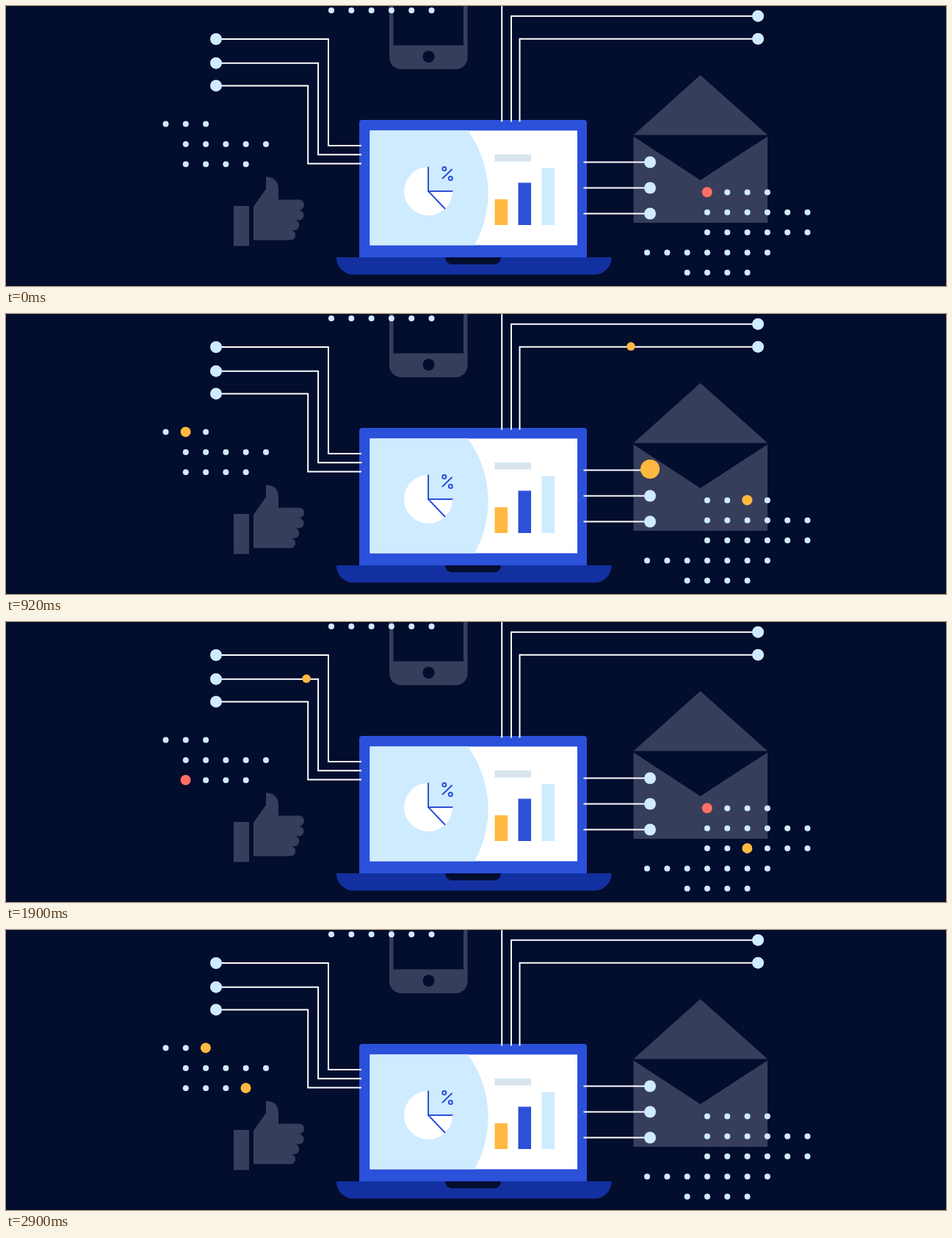
An HTML page that plays this animation: 1280 by 381 pixels, repeating every 3.2 s.

```html
<!DOCTYPE html>
<html lang="en">
<head>
<meta charset="utf-8">
<title>Connected laptop</title>
<style>
  html, body { margin: 0; width: 100%; height: 100%; overflow: hidden; background: #030d2e; }
  svg { display: block; width: 100%; height: 100%; }
  .ghost { fill: #363e5b; }
  .night { fill: #030d2e; }
  .blue { fill: #2b50da; }
  .sky { fill: #cfebff; }
  .white { fill: #fff; }
  .red { fill: #ff7062; }
  .yellow { fill: #ffb941; }
  .wire { fill: none; stroke: #fff; stroke-width: 2; }
  .pen { fill: none; stroke: #2b50da; stroke-width: 2; stroke-linecap: round; }
</style>
</head>
<body>
<svg viewBox="0 0 1280 381">
  <g class="ghost">
    <rect x="522" y="-40" width="106.5" height="126" rx="16"/>
    <path d="M854.5 175.5L945.5 94L1037 175.5ZM854.5 177.5L945.5 237L1037 177.5V295H854.5Z"/>
    <rect x="310" y="272" width="21" height="54.5"/>
    <path d="M337 318.5V273L354 249V232.5Q371 233 371 249V263.5H399a7 7 0 0 1 0 14a7 7 0 0 1-1 14h-4a7 7 0 0 1 0 13.5h-5a7 7 0 0 1 0 13.5Z"/>
  </g>
  <rect class="night" x="527.5" y="-5" width="95.5" height="58.5"/>
  <circle class="night" cx="575.5" cy="69" r="8"/>

  <rect class="blue" x="481" y="155" width="310" height="192" rx="4"/>
  <path fill="#1230a0" d="M450 342H824.5a23 23 0 0 1-23 23.500H473a23 23 0 0 1-23-23.500Z"/>
  <path class="night" d="M598 342H674a9.5 9.5 0 0 1-9.5 9.5H607.5a9.5 9.5 0 0 1-9.5-9.5Z"/>
  <rect class="white" x="495.5" y="169.500" width="282.5" height="156"/>
  <path class="sky" d="M495.5 169.5H629A145 145 0 0 1 638 325.5H495.5Z"/>
  <path class="white" d="M575 252V219A33 33 0 1 0 608 252Z"/>
  <path class="pen" d="M575 219.5V252H607.5M575 252L597.5 275.5M594.5 234.5L607 222.5"/>
  <circle class="pen" cx="596.8" cy="221.5" r="2.5"/>
  <circle class="pen" cx="605.3" cy="234.5" r="2.5"/>
  <rect fill="#d8e5ee" x="665.5" y="202" width="49.5" height="9.500"/>
  <rect class="yellow" x="665.5" y="263" width="17.5" height="35"/>
  <rect class="blue" x="697.5" y="240.5" width="17.5" height="57.500"/>
  <rect class="sky" x="729.5" y="220.5" width="17.5" height="77.500"/>
</svg>
<script>
const LOOP = 3200, BEAT = 400, GAP = 27.3, POP = 100;
const svg = document.querySelector('svg');

function add(tag, className, attributes = {}) {
  const el = document.createElementNS('http://www.w3.org/2000/svg', tag);
  el.setAttribute('class', className);
  set(el, attributes);
  return svg.appendChild(el);
}
function set(el, attributes) {
  for (const name in attributes) el.setAttribute(name, attributes[name]);
}

// Wires run from the laptop outwards; most end in a round terminal
function wire(points, terminal = true) {
  add('polyline', 'wire', { points });
  const [cx, cy] = points.at(-1);
  if (terminal) add('circle', 'sky', { cx, cy, r: 8 });
  return points;
}
const left = [], right = [];
for (let i = 0; i < 3; i++) {
  const x = 439 - 13.9 * i, y = 45 + 31.7 * i + (i === 1), port = 190 + 12.3 * i;
  left.push(wire([[484, port], [x, port], [x, y], [286, y]]));
  right.push(wire([[786.5, 212.5 + 35 * i], [877, 212.5 + 35 * i]]));
}
const top1 = wire([[675.2, 157.5], [675.2, -23]], false);
const [top2, top3] = [0, 1].map(i => {
  const x = 688 + 11.5 * i, y = 13.7 + 31 * i;
  return wire([[x, 157.5], [x, y], [1024, y]]);
});

// Dots on a square lattice, one string per row
function grid(x, y, ...rows) {
  rows.forEach((row, j) => [...row].forEach((mark, i) => {
    if (mark === 'o') add('circle', 'sky', { cx: x + i * GAP, cy: y + j * GAP, r: 4 });
  }));
  return { x, y };
}
grid(443, 6, 'oooooo');
const west = grid(217.5, 160.6, 'ooo', ' ooooo', ' oooo');
const east = grid(873, 253.5, '   oooo', '   oooooo', '   oooooo', 'ooooooo', '  oooo');

// A light that hops along a row, red on its first dot
function hopper(start, { x, y }, row, column, hops) {
  const el = add('circle', '', { cy: y + row * GAP - 0.2 });
  return t => {
    const hop = Math.floor((t - start) / BEAT);
    const lit = hop >= 0 && hop < hops;
    set(el, { class: hop ? 'yellow' : 'red', cx: x + (column + hop) * GAP - 0.2, r: lit ? 7 : 0 });
  };
}

// Pops in before leaving, swells and shrinks on arrival
function runnerRadius(t, leave, arrive) {
  const small = 5.8, big = 17.6, u = (t - arrive) / POP;
  if (t < leave) return small * Math.max(0, 1 - (leave - t) / POP);
  if (u < 0) return small;
  if (u < 1) return small + (big - small) * u ** 0.6;
  return u < 2 ? big - 15 * (u - 1) : 0;
}

// A light that follows a wire, given the time at each of its points
function runner(points, ...times) {
  const el = add('circle', 'yellow');
  const last = times.length - 1;
  return t => {
    const now = Math.min(Math.max(t, times[0]), times[last]);
    const leg = Math.max(1, times.findIndex(time => now <= time));
    const u = (now - times[leg - 1]) / (times[leg] - times[leg - 1]);
    const [x, y] = points[leg - 1].map((p, i) => p + (points[leg][i] - p) * u);
    const r = runnerRadius(t, times[0], times[last]);
    set(el, { cx: x, cy: y - 0.11 * r, r });
  };
}

const lights = [
  hopper(0, east, 0, 3, 3),
  hopper(4 * BEAT, east, 0, 3, 3),
  hopper(3 * BEAT, east, 2, 4, 4),
  hopper(BEAT, west, 0, 0, 3),
  hopper(5 * BEAT, west, 0, 0, 3),
  hopper(4 * BEAT, west, 2, 1, 4),
  runner(top3, 200, 500, 1400),
  runner(left[1], 1000, 1300, 1835, 2400),
  runner(top1, 1280, 1600),
  runner(right[0], 390, 790),
  runner(right[0], 2305, 2700),
  runner(right[2], 1100, 1500)
];

let begin;
function tick(now) {
  begin ??= now;
  lights.forEach(light => light((now - begin) % LOOP));
  requestAnimationFrame(tick);
}
requestAnimationFrame(tick);
</script>
</body>
</html>
```
